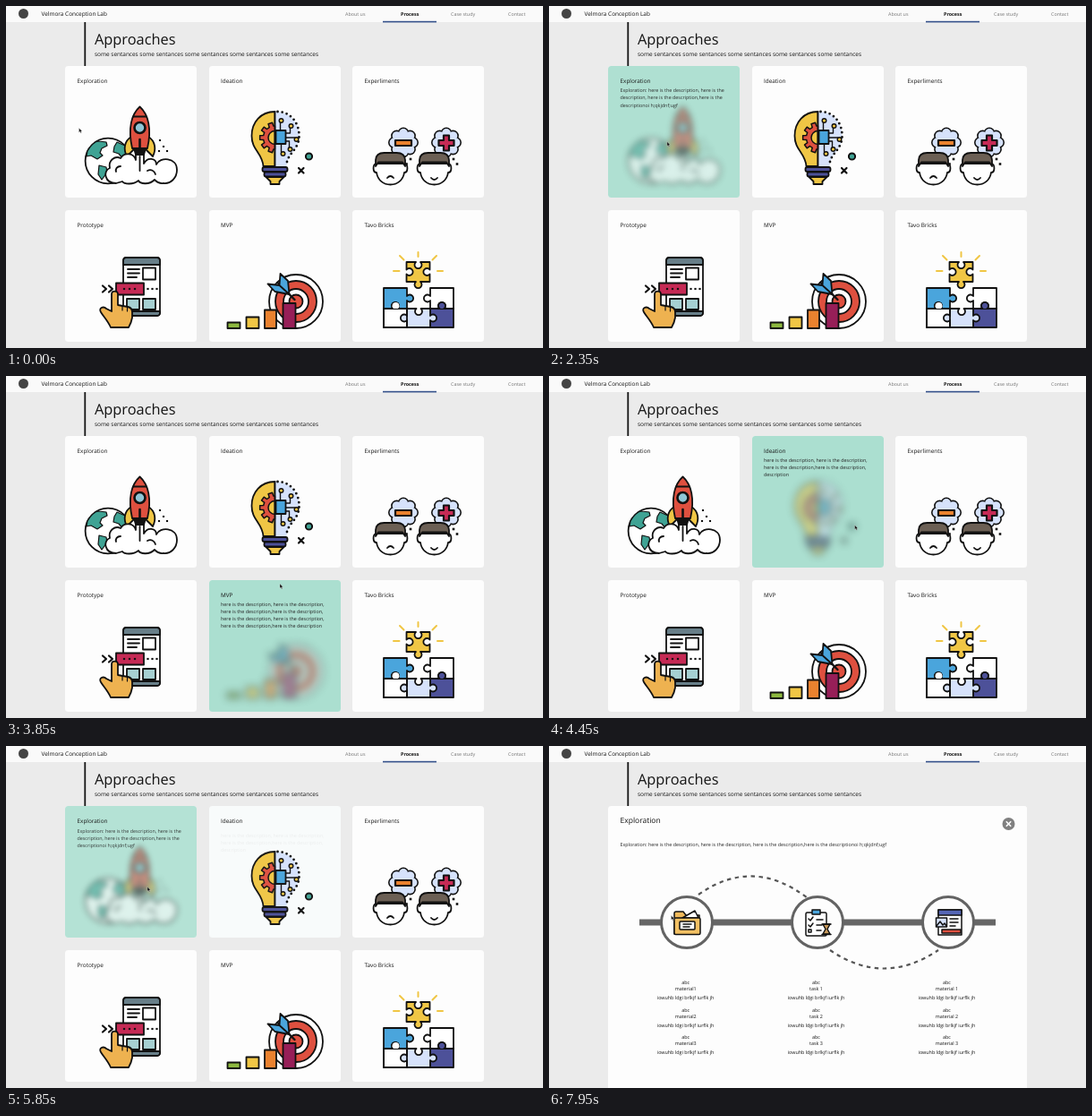
Write an HTML page that moves like this. It is 600x382 px and loops after 8 s.

```html
<!DOCTYPE html>
<html lang="en">
<head>
<meta charset="utf-8">
<title>Approaches</title>
<style>
  html, body { margin: 0; width: 100%; height: 100%; overflow: hidden; background: #ebebeb; }
  body { position: relative; font-family: "Open Sans", "Noto Sans", sans-serif; color: #151515; text-rendering: geometricPrecision; }
  svg { position: absolute; left: 0; top: 0; overflow: visible; }
  .card { position: absolute; width: 147px; height: 147px; border-radius: 3.5px; background: #fdfdfd; overflow: hidden; }
  .tint { position: absolute; left: 0; top: 0; width: 100%; height: 147px; background: #abdfd0; }
  .title { position: absolute; left: 13.5px; top: 12px; line-height: 10px; font-size: 6.4px; white-space: nowrap; }
  .text { position: absolute; left: 13.5px; font-size: 5.38px; line-height: 8.15px; color: #222; }
  .art { stroke: #111; stroke-width: 1.8; stroke-linejoin: round; stroke-linecap: round; fill: none; }
  .table text { font-size: 5.4px; text-anchor: middle; }
</style>
</head>
<body>
<svg width="600" height="382" fill="#151515">
  <rect width="600" height="18" fill="#fafafa"/>
  <circle cx="19.5" cy="8.5" r="5.5" fill="#444"/>
  <text x="39.5" y="11" font-size="6.45">Velmora Conception Lab</text>
  <g font-size="5.4" fill="#777">
    <text x="379" y="10.6">About us</text>
    <text x="441" y="10.6" fill="#151515" font-weight="700">Process</text>
    <text x="497" y="10.6">Case study</text>
    <text x="561" y="10.6">Contact</text>
  </g>
  <rect x="421" y="16.800" width="60" height="1.600" fill="#34508a"/>
  <rect x="87.400" y="18" width="1.800" height="49"/>
  <text x="99" y="43" font-size="16.35">Approaches</text>
  <text x="99" y="55.6" font-size="6.48">some sentances some sentances some sentances some sentances some sentances</text>
</svg>
<div id="cards"></div>
<svg id="cursor" width="600" height="382">
  <path id="arrow" d="M-1.500 -2.700V2.300L-.3 1.300L.5 3.100L1.400 2.700L.6 1H2.100Z" fill="#111" stroke="#fff" stroke-width=".3"/>
  <path id="beam" d="M-1.2 -2.6H1.2M0 -2.6V2.6M-1.2 2.6H1.2" stroke="#333" stroke-width=".6"/>
</svg>

<script>
const LOOP = 8000, SIZE = 147, OPEN_AT = 6453;
const RED = '#de503f', YELLOW = '#f0c645', BLUE = '#4aa5dc', PALE = '#d6e2fb', TEAL = '#3fa394',
      PURPLE = '#4d5199', PINK = '#c62a55', ORANGE = '#ea822f', SLATE = '#687f89', INK = '#111';

const path = (d, fill = 'none', more = '') => `<path d="${d}" fill="${fill}" ${more}/>`;
const rect = (x, y, w, h, fill = 'none', more = '') => `<rect x="${x}" y="${y}" width="${w}" height="${h}" fill="${fill}" ${more}/>`;
const circle = (x, y, r, fill = 'none', more = '') => `<circle cx="${x}" cy="${y}" r="${r}" fill="${fill}" ${more}/>`;
const dots = (points, size = 2.2) => points.map(([x, y]) => rect(x - size / 2, y - size / 2, size, size, INK, 'stroke="none"')).join('');
const repeat = (n, make) => Array.from({ length: n }, (_, i) => make(i)).join('');

function rocket() {
  return circle(114, 173, 25.4, '#fff')
    + path('M91 162C94 157 98 152 103 151L112 152L113 156L107 159L105 164L108 167L102 171L95 167L90 168ZM104 178L112 180L113 186L107 194L103 188ZM124 152L133 156L138 167L131 171L126 165L120 163L121 157Z', TEAL, 'stroke-width="1.200"')
    + path('M140 146C132 151 131 160 135 168L143 160ZM159 146C167 151 168 160 164 168L156 160Z', YELLOW)
    + path('M143 159H156L154 166H145Z', INK)
    + path('M149.5 112.5C140 121 136 137 141 159H158C163 137 159 121 149.5 112.5Z', RED)
    + path('M142 123.500H157')
    + circle(149.5, 136, 6, '#8fc6d6', 'stroke-width="2.600"')
    + path('M149.5 149V163', 'none', 'stroke-width="2.600"')
    + path('M123 198C110 198 108 184 116 181C114 172 122 167 128 170C132 163 143 164 145 172V166H154V176C158 168 168 170 168 177C172 168 191 169 191 183C191 192 184 199 176 198C170 199 168 196 166 194C160 200 150 199 148 195C142 200 132 199 130 196Z', '#fff')
    + path('M149.500 168V184M128 179C124 179 122 182 123 185M158 184C162 182 166 184 167 188')
    + dots([[172, 150], [176, 157], [180, 162], [171, 162]], 2.1);
}

function bulb() {
  const node = (x, y) => circle(x, y, 2.3, YELLOW, 'stroke-width="1.400"');
  const polar = (r, a) => `${300 - r * Math.sin(a)} ${147 - r * Math.cos(a)}`;
  const teeth = repeat(5, i => [[13, .1], [13, .2], [17, .28], [17, .72], [13, .8], [13, .9]]
    .map(([r, f]) => `L${polar(r, (i + f) * Math.PI / 5)}`).join(''));
  return path('M300 118C284 118 274 130 274 145C274 161 286 164 287 179H300Z', YELLOW)
    + path('M300 118C316 118 327 130 327 145C327 161 314 164 313 179H300Z', PALE, 'stroke="none"')
    + path('M303 118C317 118 327 130 327 145C327 161 314 164 313 177', 'none', 'stroke-width="2.800" stroke-dasharray="0 5.200"')
    + path(`M300 134${teeth}L300 160V154.500A7.500 7.500 0 0 1 300 139.500Z`, RED, 'stroke-width="1.500"')
    + path('M300 118V179')
    + path('M306 139V130M312 142H317V136M312 147H322M312 151H316V158M307 154V163', 'none', 'stroke-width="1.400"')
    + rect(301, 139, 11, 15, BLUE)
    + node(307, 128) + node(318, 134) + node(324, 149) + node(317, 160) + node(309, 165)
    + path('M290 191H310L305 196V199H295V196Z', YELLOW)
    + rect(286, 180, 28, 5, PURPLE, 'rx="2"') + rect(288, 185.5, 24, 5, PURPLE, 'rx="2"')
    + circle(338, 168, 3.6, TEAL, 'stroke-width="2"') + path('M326.500 181L332 186.500M332 181L326.500 186.500', 'none', 'stroke-width="2.200"');
}

function heads() {
  const bubble = (x, y) => {
    const puffs = more => repeat(8, i => {
      const a = i * Math.PI / 4;
      return circle(x + 10.5 * Math.cos(a), y + 10.5 * Math.sin(a), 4.9, PALE, more);
    });
    return puffs('stroke-width="3.200"') + puffs('stroke="none"') + circle(x, y, 11, PALE, 'stroke="none"');
  };
  const head = (x, mouth) =>
    path(`M${x - 16} 176C${x - 20} 177 ${x - 20} 186 ${x - 15.5} 186C${x - 13} 204 ${x + 13} 204 ${x + 15.5} 186C${x + 20} 186 ${x + 20} 177 ${x + 16} 176Z`, '#fff')
    + path(`M${x - 16.5} 179V172Q${x - 16} 164 ${x - 7} 164H${x + 7}Q${x + 16} 164 ${x + 16.5} 172V179L${x + 13.5} 174.500H${x - 13.5}Z`, '#6c6055')
    + path(`M${x - 3.5} 192q3.500 ${mouth} 7 0`);
  return bubble(444, 152.5) + bubble(492, 152.5)
    + rect(435, 150, 18, 6, ORANGE, 'stroke-width="2.200"')
    + path('M489 144.500H495V150H500.500V156H495V161.500H489V156H483.500V150H489Z', PINK, 'stroke-width="2.200"')
    + dots([[452, 171], [447.5, 176.5], [500, 171], [504, 176.5], [480, 171]], 2.6)
    + head(429.5, -4) + head(478.5, 4);
}

function phone() {
  return rect(131, 281, 41, 65, '#fff', 'rx="3.500"')
    + path('M131 289V284.500Q131 281 134.500 281H168.500Q172 281 172 284.500V289ZM131 341H172V342.500Q172 346 168.500 346H134.500Q131 346 131 342.500Z', SLATE)
    + path('M136 294H149M136 298.500H149M136 303H146')
    + rect(153, 292.5, 14, 13, '#fff')
    + rect(135, 327, 14, 12, '#a6d0d2') + rect(153, 327, 14, 12, '#a6d0d2')
    + rect(123, 309.5, 31, 13, PINK)
    + dots([[132, 316], [138, 316], [144, 316], [158.5, 316], [163.5, 316], [168.5, 316]], 2.2)
    + path('M108 312.500L112 316L108 319.500M115 312.500L119 316L115 319.500', 'none', 'stroke-width="2.200"')
    + path('M118 341V322C118 317.500 125 317.500 125 322V334L136 336Q141 337 141 342V348Q140 354 137 359H117C114 352 109 347 106 342C103 337 109 335 112 338Z', '#eeb250')
    + path('M130 335.500V340M135.500 336.500V341', 'none', 'stroke-width="1.200"');
}

function target() {
  return circle(323.5, 330, 30, '#fff') + circle(323.5, 330, 23, RED) + circle(323.5, 330, 14, '#fff') + circle(323.5, 330, 7.5, RED)
    + path('M303 309L322 328', 'none', 'stroke-width="2.400"')
    + path('M305 312L292 310.500L300 319L316 322ZM305 312L306 299L314.500 307L316 322Z', BLUE)
    + rect(247, 353.5, 14, 6.5, '#8db83f') + rect(268, 347.5, 14, 12.5, YELLOW)
    + rect(288.5, 339.5, 13, 20.5, ORANGE) + rect(309, 332, 14, 28, '#971f58');
}

// Sides run top, right, bottom, left: 1 is a knob, -1 a notch, 0 flat.
function piece(x, y, w, h, fill, sides) {
  const steps = sides.map((side, i) => {
    const [ux, uy] = [[1, 0], [0, 1], [-1, 0], [0, -1]][i], length = i % 2 ? h : w, part = (length - 5) / 2;
    const line = n => `l${ux * n} ${uy * n}`;
    return side ? `${line(part)}a4 4 0 1 ${side > 0 ? 1 : 0} ${ux * 5} ${uy * 5}${line(part)}` : line(length);
  });
  return path(`M${x} ${y}${steps.join('')}Z`, fill);
}

function puzzle() {
  return piece(422, 338, 26, 21, '#fff', [0, 0, 0, 0]) + piece(474, 338, 26, 21, PURPLE, [0, 0, 0, 0])
    + piece(448, 338, 26, 21, PALE, [-1, 1, 0, 1])
    + piece(422, 315, 26, 23, BLUE, [0, 1, -1, 0]) + piece(474, 315, 26, 23, '#fff', [0, 0, -1, 1])
    + piece(422, 338, 26, 21, 'none', [1, 0, 0, 0]) + path('M433 338a4 4 0 1 1 5 0Z', '#fff', 'stroke="none"')
    + path('M484.500 338a4 4 0 1 1 5 0', PURPLE)
    + piece(447.5, 286, 26, 22, YELLOW, [-1, -1, 1, -1])
    + path('M460.500 275V280M440 279L444.500 283.500M481 279L476.500 283.500M433 296H439.500M482 296H488', 'none', `stroke="${YELLOW}" stroke-width="2"`);
}

function timeline() {
  const folder = path('M-14 13V-10Q-14 -12 -12 -12H-4L-1 -8H14V13Z', '#f0b95a')
    + path('M-5 -5L9 -13L13 -5Z', '#fff') + rect(-14, -5, 29, 18.5, '#f2c063', 'rx="1.500"')
    + rect(-8, -1, 17, 9, '#fff', 'rx="1"') + path('M-4 2H5M-4 5H3');
  const clipboard = rect(-13, -11, 23, 26, '#fff', 'rx="1.500"') + rect(-6, -14, 9, 5, BLUE)
    + path('M-10 -4L-8 -2L-5 -6M-10 3L-8 5L-5 1M-1 -3H6M-1 3H5M-1 9H4') + rect(-10, 8, 3, 3)
    + path('M6 2H14L11 7.500L14 13H6L9 7.500Z', '#c99a5b') + path('M5 2H15M5 13.500H15');
  const browser = rect(-11, -14, 26, 28, '#fff') + rect(-11, -14, 26, 6, '#5566b5')
    + rect(-13.5, -5, 12, 10, PALE) + path('M-13 4L-9 -1L-6 3L-4 1L-2 4')
    + path('M2 -4H11M2 0H11M2 4H8') + rect(-7, 8, 21, 4, RED);
  const station = (x, icon) => `<g transform="translate(${x})">${circle(0, 0, 28.5, 'none', 'stroke="#636363" stroke-width="3"')}<g stroke-width="1.500">${icon}</g></g>`;
  const dashed = 'stroke="#555" stroke-width="2.200" stroke-dasharray="4.500 4.500" stroke-linecap="butt"';
  return path('M-199 0H-175M-117 0H-29M29 0H117M175 0H199', 'none', 'stroke="#666" stroke-width="7" stroke-linecap="butt"')
    + path('M-133 -31Q-72 -74 -11 -27', 'none', dashed) + path('M14 31Q74 72 135 31', 'none', dashed)
    + station(-146, folder) + station(0, clipboard) + station(146, browser);
}

function column(label) {
  return repeat(3, row => ['abc', label + (row + 1), 'iowuhb ldgi brlkjf iurflk jh']
    .map((line, i) => `<text y="${row * 30.6 + [0, 7, 17.2][i]}">${line}</text>`).join(''));
}

const phrase = 'here is the description, here is the description, here is the description,here is the description';
const cards = [
  { title: 'Exploration', draw: rocket, hovers: [[1990, 2850], [5550, Infinity]],
    text: 'Exploration: here is the description, here is the description, here is the description,here is the descriptionoi h;qkjdnf;ugf' },
  { title: 'Ideation', draw: bulb, hovers: [[3960, 4625], [5290, 5500]], text: phrase + ', description' },
  { title: 'Experliments', draw: heads, hovers: [[4625, 5270]], text: phrase },
  { title: 'Prototype', draw: phone, hovers: [[2970, 2998]], text: phrase },
  { title: 'MVP', draw: target, hovers: [[2998, 3880]], text: `${phrase}, ${phrase}` },
  { title: 'Tavo Bricks', draw: puzzle, hovers: [], text: phrase },
];

cards.forEach((card, i) => {
  const x = 66 + i % 3 * 160.5, y = i < 3 ? 67 : 228;
  card.el = document.createElement('div');
  card.el.className = 'card';
  card.el.style.cssText = `left:${x}px;top:${y}px;z-index:${i ? 0 : 1}`;
  card.el.innerHTML = `<div class="tint"></div>
    <svg class="art" width="${SIZE}" height="${SIZE}" viewBox="${x} ${y} ${SIZE} ${SIZE}">${card.draw()}</svg>
    <div class="title">${card.title}</div><div class="text">${card.text}</div>`;
  for (const name of ['tint', 'art', 'title', 'text']) card[name] = card.el.querySelector('.' + name).style;
  document.getElementById('cards').append(card.el);
});

const panel = cards[0];
panel.el.insertAdjacentHTML('beforeend', `<svg id="detail" width="468" height="319"><g transform="translate(-66 -67)">
  <g id="timeline" class="art">${timeline()}</g>
  <g class="table" fill="#151515">${['material', 'task ', 'material '].map(label => `<g class="column">${column(label)}</g>`).join('')}</g>
  <g id="close">${circle(0, 0, 7, '#808080')}${path('M-2.700 -2.700L2.700 2.700M2.700 -2.700L-2.700 2.700', 'none', 'stroke="#fff" stroke-width="1.600"')}</g>
</g></svg>`);

const $ = id => document.getElementById(id);
const columns = [...document.querySelectorAll('.column')];
const move = (el, x, y, scale = 1) => el.setAttribute('transform', `translate(${x} ${y}) scale(${scale})`);
const clamp = v => Math.max(0, Math.min(1, v));

// cubic-bezier(.25, .1, .25, 1)
function ease(value) {
  const x = clamp(value);
  let low = 0, high = 1;
  for (let i = 0; i < 20; i++) {
    const u = (low + high) / 2;
    if (.75 * u * (1 - u) + u ** 3 < x) low = u; else high = u;
  }
  return .3 * low * (1 - low) ** 2 + 3 * low * low * (1 - low) + low ** 3;
}

const route = [
  [0, 83, 139], [900, 83, 139], [1500, 38, 172], [1850, 38, 172], [1990, 66, 163], [2300, 130, 152], [2600, 150, 165],
  [2850, 175, 213], [2970, 213, 243], [3000, 228, 252], [3400, 290, 256], [3850, 307.5, 235], [3960, 304, 213],
  [4300, 305, 165], [4625, 387, 174], [5000, 427.5, 203.5], [5270, 387, 175], [5500, 227, 160], [5900, 150, 160],
  [6300, 149, 162], [7700, 149, 162], [7950, 138, 192], [8000, 138, 192],
];

function drawCursor(t) {
  const i = route.findIndex(stop => stop[0] > t), [t0, x0, y0] = route[i - 1], [t1, x1, y1] = route[i];
  const k = (t - t0) / (t1 - t0), overText = t > 6480 && t < 7700;
  for (const [id, shown] of [['arrow', !overText], ['beam', overText]]) {
    move($(id), x0 + (x1 - x0) * k, y0 + (y1 - y0) * k);
    $(id).style.display = shown ? '' : 'none';
  }
}

function drawPanel(t) {
  const p = ease((t - OPEN_AT) / 1000), width = SIZE + 321 * p, height = SIZE + 172 * p, middle = 66 + width / 2;
  panel.el.style.width = width + 'px';
  panel.el.style.height = height + 'px';
  panel.tint.height = SIZE + 34 * p + 'px';
  panel.tint.opacity *= 1 - ease((t - 6550) / 500);
  panel.art.left = (width - SIZE) / 2 + 'px';
  panel.art.top = (height - SIZE) * .75 + 'px';
  panel.art.opacity *= clamp(1 - 2.6 * p);
  panel.title.fontSize = 6.4 + 2.1 * clamp(p * 4) + 'px';
  panel.text.width = width - 28.5 + 'px';
  $('detail').style.opacity = clamp(p * 5);
  move($('timeline'), middle, 124.4 + 72.6 * p, .268 + .732 * p);
  columns.forEach((el, i) => move(el, middle - 1.5 + (i - 1) * (38.7 + 107.2 * p), 154 + 112 * p));
  move($('close'), 66 + width - 20.5, 87);
}

function drawCard(card, t) {
  const hover = Math.max(0, ...card.hovers.map(([on, off]) => ease((t - on) / 500) * (1 - ease((t - off) / 500))));
  const p = card === panel ? ease((t - OPEN_AT) / 1000) : 0;
  card.tint.opacity = hover;
  card.art.opacity = 1 - hover * .5;
  card.art.filter = hover > .01 ? `blur(${4 * hover * hover}px)` : 'none';
  card.text.opacity = hover;
  card.text.top = 29.5 - 6.5 * hover + 16 * p + 'px';
  card.text.width = '118.5px';
}

function frame() {
  const t = performance.now() % LOOP;
  cards.forEach(card => drawCard(card, t));
  drawPanel(t);
  drawCursor(t);
  requestAnimationFrame(frame);
}
$('cursor').style.zIndex = 2;
frame();
</script>
</body>
</html>
```
